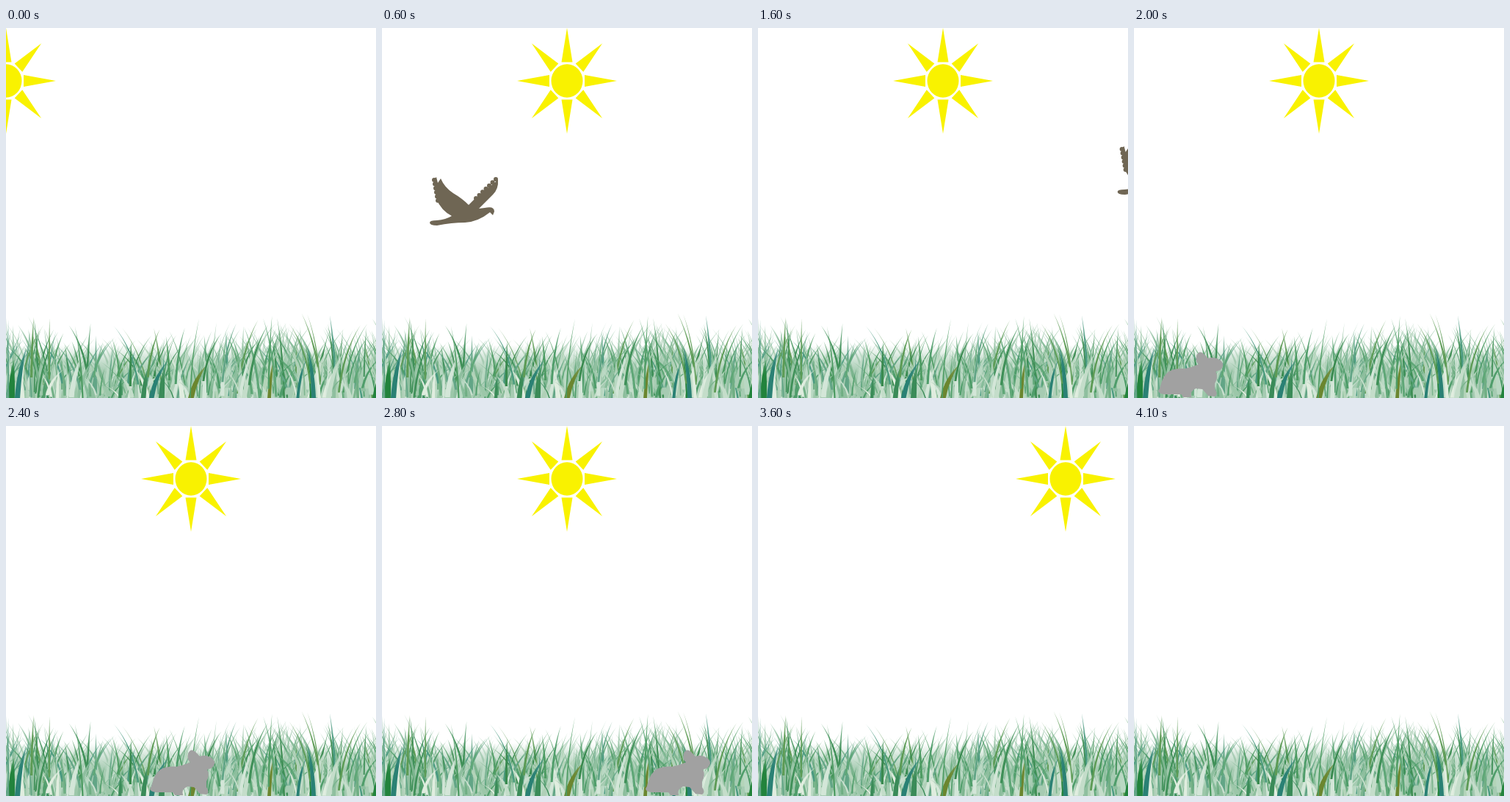
These frames come from a looping animation (504x504 px, 4.2 s). An HTML page with a canvas:

```html
<!DOCTYPE html>
<html lang="en">
<head>
<meta charset="utf-8">
<style>
  html, body { margin: 0; width: 100%; height: 100%; overflow: hidden; background: #fff; }
  canvas { display: block; }
</style>
</head>
<body>
<canvas id="stage" width="504" height="504"></canvas>
<script>
const SIZE = 504, LOOP = 4200, STEP = 100;
const ctx = document.getElementById('stage').getContext('2d');
const mix = (a, b, p) => a + (b - a) * p;

function makeSun() {
  const path = new Path2D();
  path.arc(0, 0, 21.5, 0, 2 * Math.PI);
  for (let i = 0; i < 8; i++) {
    const c = Math.cos(i * Math.PI / 4), s = Math.sin(i * Math.PI / 4);
    const at = (x, y) => [x * c - y * s, x * s + y * c];
    path.moveTo(...at(68, 0));
    path.lineTo(...at(24, 7.5));
    path.lineTo(...at(24, -7.5));
    path.closePath();
  }
  return path;
}

function makeBird() {
  const path = new Path2D(`M0 62 Q0 66 10 66 Q30 62 48 62 Q66 61 82 48 L86 52 L88 47 Q88 39 75 42
    L67 43 L86 24 Q94 16 93 4 L64 27 L53 38 Q44 29 32 22 Q20 14 15 2 L11 8 L9 0 L5 4 L9 30
    Q16 46 30 53 Q22 58 10 59 Q0 59 0 62 Z`);
  const feathers = (count, x0, y0, x1, y1) => {
    for (let i = 0; i < count; i++) {
      const x = mix(x0, x1, i / (count - 1)), y = mix(y0, y1, i / (count - 1));
      path.moveTo(x + 3, y);
      path.arc(x, y, 3, 0, 2 * Math.PI, true);
    }
  };
  feathers(7, 90, 3, 63, 29);
  feathers(6, 6, 4, 11, 32);
  return path;
}

const rabbit = new Path2D(`M0 54 Q2 52 3 47 Q6 34 14 28 Q24 23 36 24 Q46 22 55 18 Q50 15 52 6
  Q56 -3 64 6 L68 10 Q78 7 86 14 Q91 20 84 26 L78 28 Q82 35 77 44 L77 52 Q82 59 77 62 L68 61
  L60 52 L51 51 Q42 55 45 63 L34 63 L31 59 L8 59 Q0 58 0 54 Z`);

// Keys are [time, x, y]; positions are linear between them.
const sprites = [
  { path: makeSun(), color: '#f9f200', scaleY: 1.06,
    keys: [[0, 0, 72], [400, 252, 72], [3300, 252, 72], [3900, 586, 72]] },
  { path: makeBird(), color: '#6f6654', scaleY: 1,
    keys: [[200, -101, 229], [600, 65, 203], [700, 107, 168], [1000, 231, 251], [1100, 273, 226], [1700, 533, 148]] },
  { path: rabbit, color: '#a1a1a1', scaleY: 1,
    keys: [[1700, -89, 440], [3200, 522, 440]] }
];

function positionAt(keys, t) {
  const next = keys.findIndex(key => key[0] > t);
  if (next < 1) return keys.at(next).slice(1);
  const [t0, x0, y0] = keys[next - 1], [t1, x1, y1] = keys[next];
  const p = (t - t0) / (t1 - t0);
  return [mix(x0, x1, p), mix(y0, y1, p)];
}

function makeGrass() {
  const canvas = document.createElement('canvas');
  canvas.width = canvas.height = SIZE;
  const g = canvas.getContext('2d');
  let seed = 29;
  const random = () => (seed = seed * 16807 % 2147483647) / 2147483647;
  const between = (a, b) => mix(a, b, random());
  const pick = list => list[Math.floor(random() * list.length)];
  // The skyline dips around x = 180 and rises to the right.
  const ridge = x => 9 * Math.cos((x - 395) / 68);

  const pale = ['#a6cbb2', '#8fbf9f', '#b9d8c3', '#9cc7a9', '#b4d4b9', '#c8dfce'];
  const middle = ['#6fae83', '#5fa777', '#7db58f', '#88bd9b', '#62a586', '#4f9d6a'];
  const dark = ['#3f9058', '#4d9b62', '#398a4f', '#5d9b55', '#4a9a80'];
  const light = ['#e0eddf', '#d3e6d8', '#c4ddca', '#b0d0b8'];
  const accent = ['#22833c', '#2a8174', '#6b862f', '#3a8b58'];

  function blade(x, y, tipX, tipY, width, color) {
    const bendX = mix(x, tipX, 0.2), bendY = mix(y, tipY, 0.6);
    const fade = g.createLinearGradient(0, y, 0, tipY);
    fade.addColorStop(0.6, color);
    fade.addColorStop(1, color + '90');
    g.fillStyle = fade;
    g.beginPath();
    g.moveTo(x - width / 2, y);
    g.quadraticCurveTo(bendX - width / 2, bendY, tipX, tipY);
    g.quadraticCurveTo(bendX + width / 2, bendY, x + width / 2, y);
    g.fill();
  }
  function layer(count, [top, bottom], [baseTop, baseBottom], lean, maxWidth, colors) {
    for (let i = 0; i < count; i++) {
      const x = between(-30, 534), tipX = x + between(-lean, lean);
      blade(x, between(baseTop, baseBottom), tipX, between(top, bottom) - ridge(tipX),
        between(1.5, maxWidth), pick(colors));
    }
  }

  const ground = g.createLinearGradient(0, 432, 0, SIZE);
  ground.addColorStop(0, '#a6cbb200');
  ground.addColorStop(0.5, '#a6cbb2');
  g.fillStyle = ground;
  g.fillRect(0, 432, SIZE, 72);

  layer(260, [410, 455], [480, 515], 40, 5, pale);
  layer(150, [412, 460], [480, 515], 40, 4, middle);
  layer(60, [396, 440], [480, 515], 36, 3.5, dark);
  layer(130, [440, 480], [490, 515], 25, 9, pale);
  layer(70, [430, 480], [480, 510], 40, 4, middle);
  layer(55, [440, 485], [500, 515], 25, 7, light);
  layer(14, [440, 470], [504, 515], 25, 9, accent);
  layer(34, [390, 418], [470, 510], 34, 3.5, [...dark, ...middle]);
  return canvas;
}
const grass = makeGrass();

function draw() {
  const t = Math.floor(performance.now() % LOOP / STEP) * STEP;
  ctx.fillStyle = '#fff';
  ctx.fillRect(0, 0, SIZE, SIZE);
  ctx.drawImage(grass, 0, 0);
  for (const { path, color, scaleY, keys } of sprites) {
    ctx.save();
    ctx.translate(...positionAt(keys, t));
    ctx.scale(1, scaleY);
    ctx.fillStyle = color;
    ctx.fill(path);
    ctx.restore();
  }
  requestAnimationFrame(draw);
}
draw();
</script>
</body>
</html>
```
